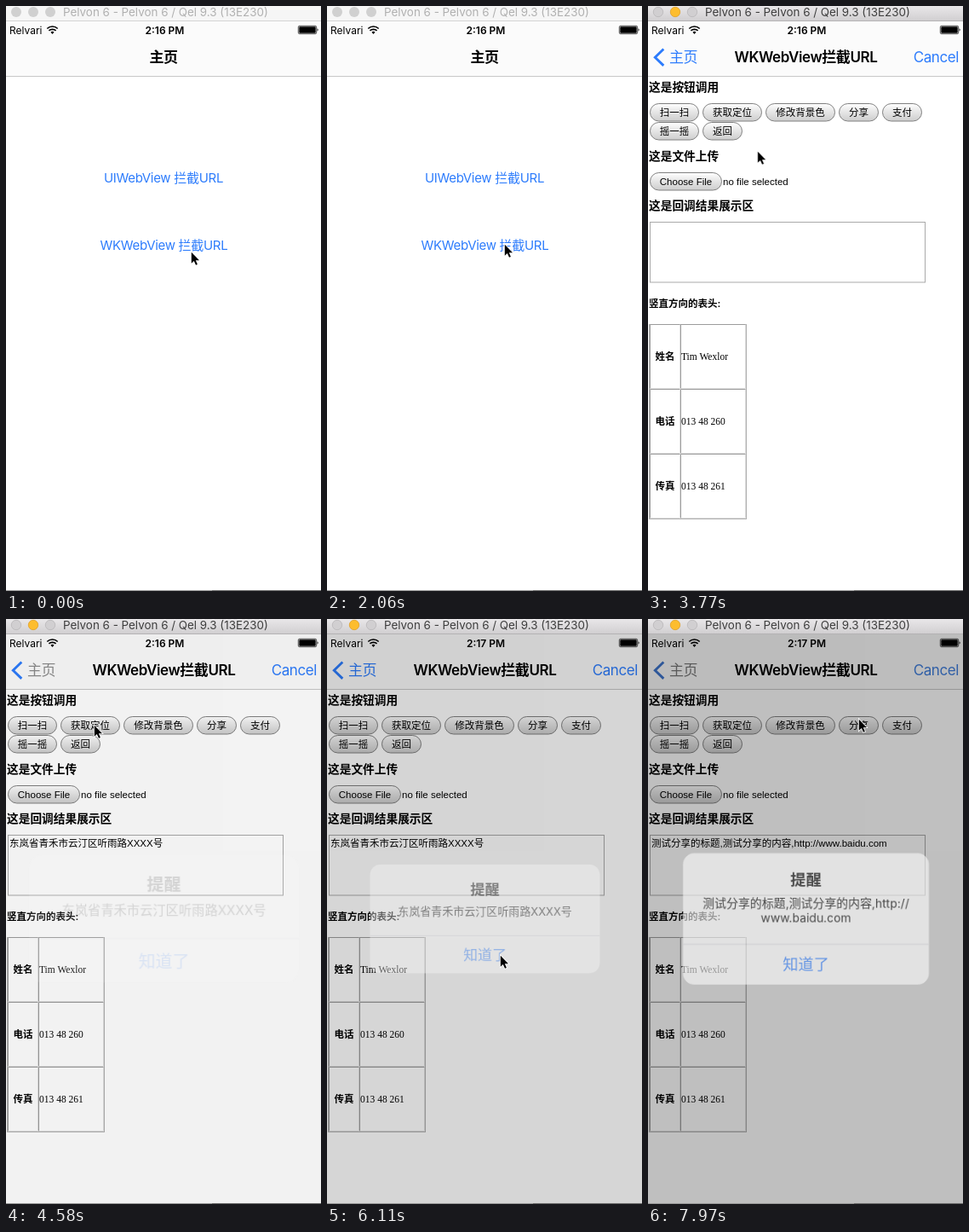
These frames come from a looping animation (370 by 686 pixels, 8000 ms). An HTML page:

```html
<!DOCTYPE html>
<html lang="zh-CN">
<head>
<meta charset="utf-8">
<title>WebView demo</title>
<style>
html, body { margin: 0; width: 100%; height: 100%; overflow: hidden; background: #fff; }
svg { display: block; width: 100%; height: 100%; }
text { font-family: Inter, "Noto Sans CJK SC", "Noto Sans CJK", sans-serif; white-space: pre; }
.web text { font: 11.5px "Liberation Sans", "Noto Sans CJK SC", "Noto Sans CJK", sans-serif; }
.web .head { font-size: 13.7px; font-weight: bold; }
.web .strong { font-weight: bold; }
.web .cell { font-family: "Liberation Serif", "Noto Serif", serif; }
.mid { text-anchor: middle; }
.nav { font-size: 17px; letter-spacing: -.4px; }
.bold { font-weight: 600; }
.link { font-size: 15px; letter-spacing: -.3px; fill: #2d7cfc; }
.window { font-size: 13.4px; }
.status { font-size: 12px; }
.msg { font-size: 13px; }
.ok { font-size: 17px; fill: #2d7cfc; }

/* Every animation shares one 8 s clock; 1% = 80 ms. */
.anim { animation: 8s linear infinite; }
.step { animation: 8s step-end infinite; }
.cursor { animation-name: cursor; }
.active { animation-name: activate; }
.press { animation-name: press; }
.home { animation-name: home; }
.page { animation-name: page; }
.shadow { animation-name: shadow; }
.home-title { animation-name: home-title; }
.page-title { animation-name: page-title; }
.appear { animation-name: appear; }
.web { animation-name: load; }
.early { animation-name: early; }
.late { animation-name: late; }
.address { animation-name: address; }
.share { animation-name: share; }
.dim { animation-name: dim; }
.alert { transform-origin: 185.5px 351.7px; }
.first { animation-name: first; }
.second { animation-name: second; }
.tint { fill: #2d7cfc; animation-name: tint; }
.back { fill: #2d7cfc; animation-name: back; }
.chevron { fill: none; stroke: #2d7cfc; stroke-width: 2.9; animation-name: chevron; }

@keyframes cursor {
  0%, .75% { transform: translate(217px, 288px); }
  3.625%, 8.125% { transform: translate(214px, 283px); }
  8.875%, 11.875% { transform: translate(213px, 282px); }
  13.25%, 15.5% { transform: translate(204px, 279px); }
  17.5% { transform: translate(195px, 286px); }
  20% { transform: translate(207px, 296px); }
  22.5% { transform: translate(216px, 288px); }
  25% { transform: translate(208px, 281px); }
  25.75%, 42.75% { transform: translate(208px, 279px); }
  44.875%, 46.375% { transform: translate(132px, 177px); }
  52.125%, 63.375% { transform: translate(103px, 124px); }
  65.625% { transform: translate(206px, 360px); }
  67.5% { transform: translate(197px, 378px); }
  69.875%, 80% { transform: translate(203px, 394px); }
  81.875%, 84.125% { transform: translate(196px, 161px); }
  88.125% { transform: translate(257px, 122px); }
  90.625%, 100% { transform: translate(247px, 117px); }
}
@keyframes activate { 0% { opacity: 0; } 29.5%, 100% { opacity: 1; } }
@keyframes press { 0%, 29.4% { opacity: 1; } 29.5%, 30% { opacity: .25; } 33%, 100% { opacity: 1; } }

@keyframes home {
  0%, 30% { transform: none; animation-timing-function: cubic-bezier(.2,.4,.2,1); }
  36.5%, 100% { transform: translateX(-111px); }
}
@keyframes page {
  0%, 30% { transform: translateX(370px); animation-timing-function: cubic-bezier(.2,.4,.2,1); }
  36.5%, 100% { transform: none; }
}
@keyframes shadow { 0%, 29.9% { opacity: 0; } 30%, 36% { opacity: 1; } 36.5%, 100% { opacity: 0; } }
@keyframes home-title {
  0%, 30% { transform: none; opacity: 1; animation-timing-function: cubic-bezier(.2,.4,.2,1); }
  36.25%, 100% { transform: translateX(-143px); opacity: 0; }
}
@keyframes page-title {
  0%, 30% { transform: translateX(160px); opacity: 0; animation-timing-function: cubic-bezier(.2,.4,.2,1); }
  36.25%, 100% { transform: none; opacity: 1; }
}
@keyframes appear {
  0%, 30% { opacity: 0; animation-timing-function: cubic-bezier(.2,.4,.2,1); }
  36.25%, 100% { opacity: 1; }
}
@keyframes load { 0% { opacity: 0; } 37.5%, 100% { opacity: 1; } }

@keyframes early { 0% { opacity: 1; } 60%, 100% { opacity: 0; } }
@keyframes late { 0% { opacity: 0; } 60%, 100% { opacity: 1; } }
@keyframes address { 0% { opacity: 0; } 55.75% { opacity: 1; } 98.125%, 100% { opacity: 0; } }
@keyframes share { 0% { opacity: 0; } 98.125%, 100% { opacity: 1; } }

@keyframes dim {
  0%, 57.03% { opacity: 0; animation-timing-function: cubic-bezier(.2,.4,.2,1); }
  61.25%, 75.35% { opacity: .4; animation-timing-function: cubic-bezier(.2,.4,.2,1); }
  79.6%, 98.6% { opacity: 0; animation-timing-function: cubic-bezier(.3,.5,.6,1); }
  100% { opacity: .27; }
}
@keyframes first {
  0%, 57.03% { opacity: 0; transform: scale(1.2); animation-timing-function: cubic-bezier(.2,.4,.2,1); }
  61.25%, 75.35% { opacity: 1; transform: none; animation-timing-function: cubic-bezier(.2,.4,.2,1); }
  79.6%, 100% { opacity: 0; transform: none; }
}
@keyframes second {
  0%, 98.6% { opacity: 0; transform: scale(1.2); animation-timing-function: cubic-bezier(.3,.5,.6,1); }
  100% { opacity: .66; transform: scale(1.06); }
}
@keyframes tint {
  0%, 58% { fill: #2d7cfc; } 61.25%, 75.275% { fill: #8c8c8c; }
  76.3%, 98.8% { fill: #2d7cfc; } 100% { fill: #4a80d0; }
}
@keyframes chevron {
  0%, 58% { stroke: #2d7cfc; } 61.25%, 75.275% { stroke: #7c7c7c; }
  76.3%, 98.8% { stroke: #2d7cfc; } 100% { stroke: #4672b8; }
}
@keyframes back {
  0%, 57% { fill: #2d7cfc; } 57.25%, 75.275% { fill: #8c8c8c; }
  76.2%, 98.6% { fill: #2d7cfc; } 98.9%, 100% { fill: #777; }
}
</style>
</head>
<body>
<svg viewBox="0 0 370 686">
  <defs>
    <linearGradient id="bar" x2="0" y2="1">
      <stop stop-color="#e9e7e9"/><stop offset="1" stop-color="#d1cfd1"/>
    </linearGradient>
    <linearGradient id="pill" x2="0" y2="1">
      <stop stop-color="#fff"/><stop offset=".35" stop-color="#ececec"/><stop offset="1" stop-color="#cdcdcd"/>
    </linearGradient>
    <linearGradient id="edge">
      <stop stop-opacity="0"/><stop offset="1" stop-opacity=".2"/>
    </linearGradient>
  </defs>
  <rect width="370" height="686" fill="#fff"/>

  <g class="anim home">
    <text class="link mid" x="185" y="207">UIWebView 拦截URL</text>
    <text class="link mid anim press" x="185.5" y="286">WKWebView 拦截URL</text>
  </g>

  <g class="anim page">
    <rect class="anim shadow" x="-9" y="82" width="9" height="604" fill="url(#edge)"/>
    <rect y="82" width="370" height="604" fill="#fff"/>
    <g class="step web">
      <text class="head" x="1" y="100">这是按钮调用</text>
      <text class="head" x="1" y="181">这是文件上传</text>
      <text class="head" x="1" y="239">这是回调结果展示区</text>
      <g id="pills" fill="url(#pill)" stroke="#808080"></g>
      <text x="88" y="210">no file selected</text>
      <rect x="2.5" y="253.5" width="323" height="70.5" fill="#fff" stroke="#a9a9a9"/>
      <text class="step address" x="4" y="267">东岚省青禾市云汀区听雨路XXXX号</text>
      <text class="step share" x="4" y="267">测试分享的标题,测试分享的内容,http://www.baidu.com</text>
      <text class="strong" x="1" y="353">竖直方向的表头:</text>
      <rect x="1.5" y="373.5" width="114" height="228" fill="none" stroke="#b0b0b0"/>
      <g id="table" fill="none"></g>
    </g>
  </g>

  <rect y="17" width="370" height="65" fill="#fbfbfb"/>
  <path d="M0 82.5H370" stroke="#c8c8c8"/>
  <text class="nav bold mid anim home-title" x="185" y="66">主页</text>
  <text class="nav bold mid anim page-title" x="185.5" y="66">WKWebView拦截URL</text>
  <g class="anim appear">
    <path class="anim chevron" d="M18.3 50.5L8.3 60.2 18.3 69.9"/>
    <text class="nav anim back" x="25" y="66">主页</text>
    <text class="nav anim tint" x="365" y="66" text-anchor="end">Cancel</text>
  </g>

  <text class="status" x="4" y="32.5">Relvari</text>
  <g fill="none" stroke="#000" stroke-width="1.7">
    <path d="M48.3 26.5a9 9 0 0 1 12.4 0M50.4 28.9a6 6 0 0 1 8.2 0"/>
    <path d="M52.5 30.7a3 3 0 0 1 4 0L54.5 33z" fill="#000" stroke="none"/>
  </g>
  <text class="status bold mid step early" x="186.5" y="32.5">2:16 PM</text>
  <text class="status bold mid step late" x="186.5" y="32.5">2:17 PM</text>
  <rect x="343.3" y="23.3" width="21.4" height="9.4" rx="1.5" fill="none" stroke="#000" stroke-width=".7"/>
  <rect x="344.3" y="24.3" width="19.4" height="7.4" rx=".6"/>
  <path d="M365.6 26.3q2 1.7 0 3.4z"/>

  <rect class="anim dim" y="17.5" width="370" height="669"/>

  <g class="alert anim first">
    <rect x="50.5" y="287.7" width="270" height="127.8" rx="12.5" fill="#f8f8f8"/>
    <text class="bold mid" x="185.5" y="323.5" font-size="17">提醒</text>
    <text class="msg mid" x="185.5" y="347.5">东岚省青禾市云汀区听雨路XXXX号</text>
    <path d="M50.5 371.5h270" stroke="#dcdce0"/>
    <text class="ok mid" x="185.5" y="400">知道了</text>
  </g>
  <g class="alert anim second">
    <rect x="50.5" y="279.7" width="270" height="144" rx="12.5" fill="#f8f8f8"/>
    <text class="bold mid" x="185.5" y="315.5" font-size="17">提醒</text>
    <text class="msg mid" x="185.5" y="339.5">测试分享的标题,测试分享的内容,http://</text>
    <text class="msg mid" x="185.5" y="355">www.baidu.com</text>
    <path d="M50.5 379.5h270" stroke="#dcdce0"/>
    <text class="ok mid" x="185.5" y="408">知道了</text>
  </g>

  <rect width="370" height="17" fill="#f6f6f6"/>
  <path d="M0 17.5H370" stroke="#d4d4d4"/>
  <g fill="#d0d0d0">
    <circle cx="12" cy="7" r="6"/><circle cx="32" cy="7" r="6"/><circle cx="52" cy="7" r="6"/>
  </g>
  <text class="window" x="67" y="12" fill="#b0b0b0">Pelvon 6 - Pelvon 6 / Qel 9.3 (13E230)</text>
  <g class="step active">
    <rect width="370" height="17" fill="url(#bar)"/>
    <path d="M0 17.5H370" stroke="#b4b2b4"/>
    <g fill="#d1cfd1" stroke="#b9b7b9" stroke-width=".8">
      <circle cx="12" cy="7" r="5.7"/><circle cx="52" cy="7" r="5.7"/>
      <circle cx="32" cy="7" r="5.7" fill="#fdbd2e" stroke="#e0a027"/>
    </g>
    <text class="window" x="67" y="12" fill="#3e3e3e">Pelvon 6 - Pelvon 6 / Qel 9.3 (13E230)</text>
  </g>
  <path d="M0 685.5H242" stroke="#989898"/>
  <path d="M242 685.5H370" stroke="#6a6a6a"/>

  <path class="anim cursor" d="M.8 .8V13.8L3.8 11 6 15.8 7.9 15 5.8 10.2H10Z"
    stroke="#fff" stroke-width="1.6" paint-order="stroke"/>
</svg>
<script>
const pill = (x, y, width, label) => `
  <rect x="${x + .5}" y="${y + .5}" width="${width - 1}" height="20.5" rx="10.25"/>
  <text class="mid" x="${x + width / 2}" y="${y + 15}" fill="#000" stroke="none">${label}</text>`;

// Inset cell border: dark top and left, light bottom and right.
const cell = (x, y, w, h) => `
  <path d="M${x} ${y + h}h${w}v${-h}" stroke="#dedede"/>
  <path d="M${x} ${y + h}v${-h}h${w}" stroke="#9c9c9c"/>`;

const row = ([name, value], i) => {
  const y = 373.5 + i * 76;
  return cell(2.5, y, 35, 75) + cell(38.5, y, 76, 75) + `
  <g fill="#000">
    <text class="strong mid" x="20" y="${y + 41.5}">${name}</text>
    <text class="cell" x="39" y="${y + 41.5}">${value}</text>
  </g>`;
};

document.getElementById('pills').innerHTML = [
  [2, 114, 58, '扫一扫'], [64, 114, 70, '获取定位'], [138, 114, 82, '修改背景色'],
  [224, 114, 47, '分享'], [275, 114, 47, '支付'],
  [2, 136, 58, '摇一摇'], [64, 136, 47, '返回'], [2, 195, 85, 'Choose File']
].map(p => pill(...p)).join('');

document.getElementById('table').innerHTML = [
  ['姓名', 'Tim Wexlor'], ['电话', '013 48 260'], ['传真', '013 48 261']
].map(row).join('');
</script>
</body>
</html>
```
